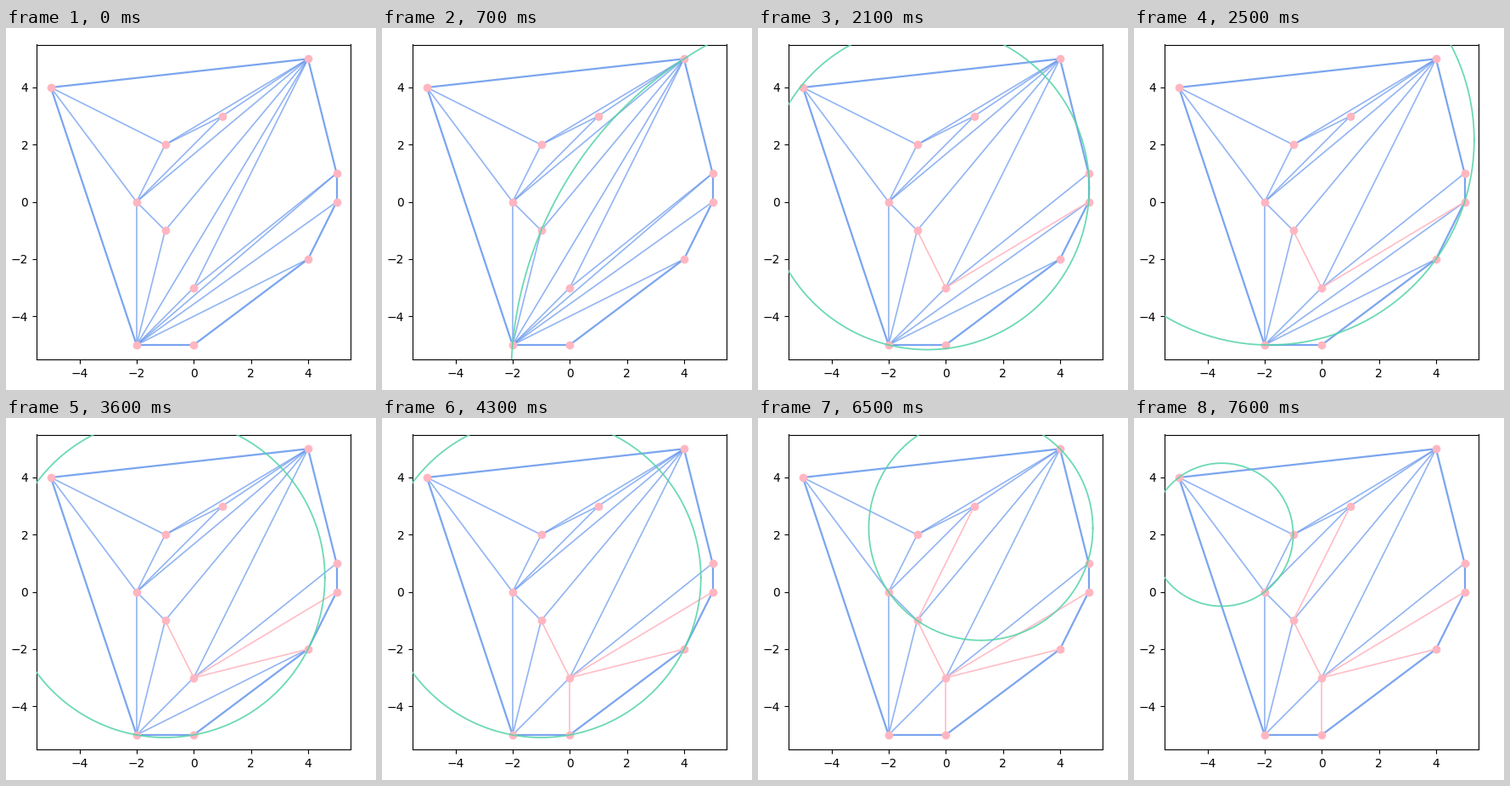
A matplotlib script that plays this animation: 436 px wide and 426 px high, repeating every 8 s.

```python
import numpy as np
import matplotlib.pyplot as plt
from matplotlib.animation import FuncAnimation

WIDTH, HEIGHT, DPI = 436, 426, 100
FRAME_MS, FRAMES = 100, 80
FIRST_STEP_MS, STEP_MS = 185, 562
BLUE, PINK, GREEN = "cornflowerblue", "lightpink", "#52d3a6"

POINTS = {
    "A": (-5, 4), "B": (4, 5), "C": (-1, 2), "D": (1, 3),
    "E": (-2, 0), "F": (-1, -1), "G": (0, -3), "H": (5, 1),
    "I": (5, 0), "J": (4, -2), "K": (0, -5), "L": (-2, -5),
}
HULL = "AB BH HI IJ JK KL LA".split()
INNER = "AC AE CE CD CB DB ED EB EF EL FL FB LB LG GB GH LH LI LJ".split()

# Each check: triangle, edge removed, edge inserted.
CHECKS = [
    ("LFB", "LB", "FG"),
    ("LHI", "LH", "GI"),
    ("LIJ", "LI", "GJ"),
    ("LJK", "LJ", "GK"),
    ("AEL", None, None),
    ("EBF", "EB", "DF"),
    ("ACE", None, None),
]


def circumcircle(triangle):
    p = np.array([POINTS[name] for name in triangle], float)
    squares = (p ** 2).sum(axis=1)
    center = np.linalg.solve(2 * (p[1:] - p[0]), squares[1:] - squares[0])
    radius = np.hypot(*(p[0] - center))
    angle = np.linspace(0, 2 * np.pi, 721)
    return center[0] + radius * np.cos(angle), center[1] + radius * np.sin(angle)


fig = plt.figure(figsize=(WIDTH / DPI, HEIGHT / DPI), dpi=DPI, facecolor="white")
ax = fig.add_axes([36 / WIDTH, 36.2 / HEIGHT, 370.4 / WIDTH, 370.3 / HEIGHT])
ax.set(xlim=(-5.5, 5.5), ylim=(-5.5, 5.5),
       xticks=range(-4, 5, 2), yticks=range(-4, 5, 2))


def draw_edge(edge, color, width, alpha):
    xs, ys = zip(*(POINTS[name] for name in edge))
    return ax.plot(xs, ys, color=color, lw=width, alpha=alpha, zorder=2)[0]


for edge in HULL:
    draw_edge(edge, BLUE, 1.6, 0.85)
inner = {edge: draw_edge(edge, BLUE, 1.2, 0.7) for edge in INNER}
flipped = {new: draw_edge(new, PINK, 1.2, 0.9) for _, _, new in CHECKS if new}
ax.plot(*zip(*POINTS.values()), "o", color=PINK, ms=6, zorder=3)
circle, = ax.plot([], [], color=GREEN, lw=1.3, alpha=0.85, zorder=4)
circles = [circumcircle(triangle) for triangle, _, _ in CHECKS]


def update(frame):
    step = (frame * FRAME_MS - FIRST_STEP_MS) // STEP_MS
    if step < 0:
        circle.set_data([], [])
    else:
        circle.set_data(*circles[min(step // 2, len(circles) - 1)])
    for index, (_, old, new) in enumerate(CHECKS):
        if new:
            done = step > 2 * index
            inner[old].set_visible(not done)
            flipped[new].set_visible(done)
    return [circle, *inner.values(), *flipped.values()]


anim = FuncAnimation(fig, update, frames=FRAMES, interval=FRAME_MS,
                     repeat=True, repeat_delay=0, blit=False)
plt.show()
```
